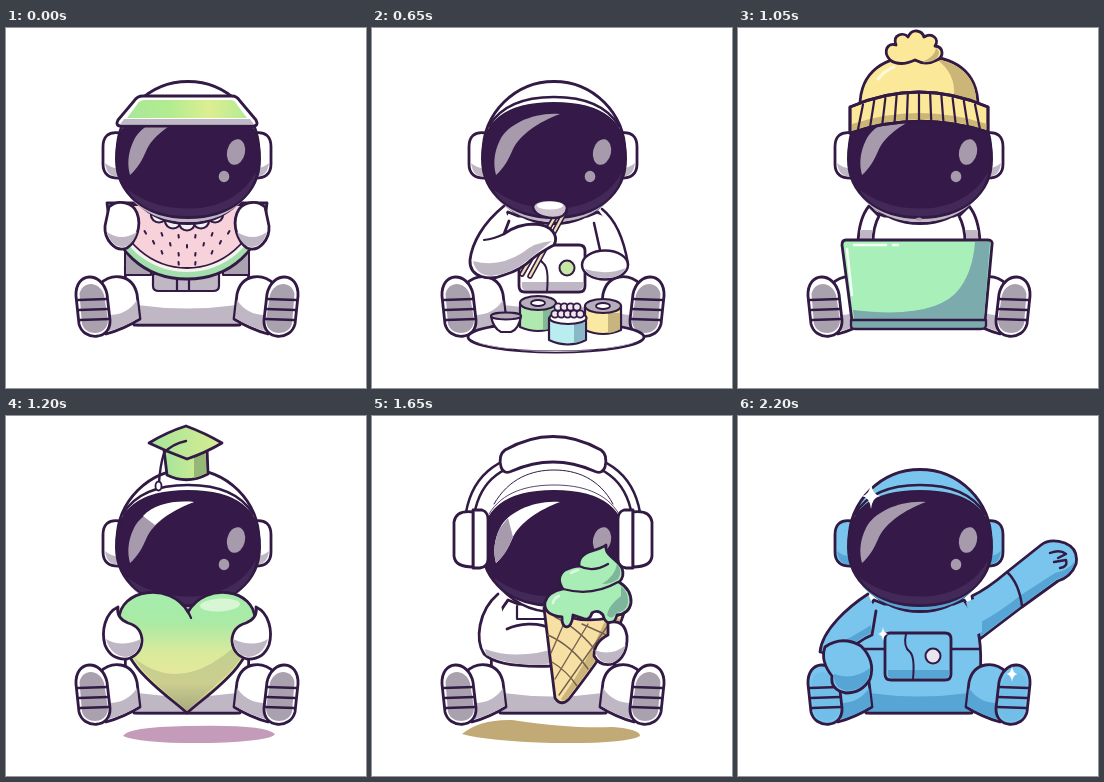
Write an HTML page that moves like this. It is 360 px wide and 360 px high and loops after 2250 ms.

```html
<!DOCTYPE html>
<html lang="en">
<head>
<meta charset="utf-8">
<title>Astronaut moods</title>
<style>
html, body { margin: 0; width: 100%; height: 100%; overflow: hidden; background: #fff; }
svg { display: block; width: 100vw; height: 100vh; }
.pose { display: none; }
</style>
</head>
<body>
<svg id="stage" viewBox="0 0 360 360" stroke-linecap="round" stroke-linejoin="round"></svg>
<script>
const INK = '#321a45', VISOR = '#351a49', GLARE = '#a69aac';
const WHITE = { suit: '#fff', shade: '#bfb7c4', sole: '#a9a1ae' };
const BLUE = { suit: '#79c5ed', shade: '#56a5d5', sole: '#71bfe9' };

// drawing helpers: outlined shape, flat shape, line, mirrored copy
const shape = (d, fill, w = 2.8) => `<path d="${d}" fill="${fill}" stroke="${INK}" stroke-width="${w}"/>`;
const flat = (d, fill) => `<path d="${d}" fill="${fill}"/>`;
const line = (d, w = 2.5, color = INK) => `<path d="${d}" fill="none" stroke="${color}" stroke-width="${w}"/>`;
const oval = (x, y, rx, ry, fill, w = 2.5, turn = 0) =>
  `<ellipse cx="${x}" cy="${y}" rx="${rx}" ry="${ry}" fill="${fill}" transform="rotate(${turn} ${x} ${y})"` +
  (w ? ` stroke="${INK}" stroke-width="${w}"/>` : '/>');
const flip = s => `<g transform="translate(362) scale(-1 1)">${s}</g>`;
const both = s => s + flip(s);

const grad = (id, stops, dir) => `<linearGradient id="${id}" ${dir}>` +
  stops.map((c, i) => `<stop offset="${i / (stops.length - 1)}" stop-color="${c}"/>`).join('') + '</linearGradient>';
const DOWN = 'x1="0" y1="0" x2="0" y2="1"';
const defs = '<defs>' +
  grad('band', ['#a9e89a', '#b2eb90', '#dcee92', '#b0ea95'], 'gradientUnits="userSpaceOnUse" x1="120" y1="0" x2="245" y2="0"') +
  grad('heart', ['#a6edae', '#a9eaa5', '#d9ea9c', '#e9e79b', '#a9a880'], DOWN) +
  grad('cap', ['#a5e59b', '#d8ec91'], 'x1="0" y1="0" x2="1" y2="0"') + '</defs>';

function ears(c) {
  return both(shape('M114 105 C102 103 97 109 97 119 V136 C97 146 103 151 115 150Z', c.suit) +
    flat('M99 135 Q106 141 113 140 V148 Q101 150 99 135Z', c.shade));
}

function body(c) {
  const torso = shape('M146 188 L136 184 C119 205 118 235 120 262 L128 297 H234 L242 262 C244 235 243 205 226 184 L216 188Z', c.suit) +
    flat('M131 277 Q181 284 231 277 V296 H131Z', c.shade) + line('M131 297 H231');
  const leg = shape('M94 256 C105 245 126 245 131 266 L134 291 Q118 301 100 306Z', c.suit) +
    flat('M103 287 Q121 287 131 272 L133 290 Q118 299 103 303Z', c.shade);
  const sole = shape('M70 268 C69 243 96 243 101 266 L104 292 C105 313 77 313 73 296Z', c.suit) +
    flat('M73.5 266 C76 253 93 252 98 267 L102 292 C102 308 80 309 76 296Z', c.sole) +
    line('M72 272 L101 271 M73 282 L102 281 M74 292 L103 291', 2.4);
  return torso + both(leg + sole);
}

function pack(c, knob) {
  return shape('M152 217 H207 Q213 217 213 223 V258 Q213 264 207 264 H153 Q147 264 147 258 V223 Q147 217 152 217Z', c.suit) +
    flat('M150 254 H211 Q212 262 207 262 H153 Q149 262 150 254Z', c.shade) +
    line('M168 218 Q165 231 172 236 Q177 241 175 263', 2) + oval(195, 240, 7.5, 7.5, knob, 2);
}

const RIDGE = 'M117 98 C130 76 155 69 182 69 C209 69 234 76 247 98';
const RIM = 'M124 170 Q181 204 239 170 Q218 194 182 194 Q146 194 124 170Z';
const shell = c => oval(182, 124.5, 71, 71, c.suit, 2.8) + flat(RIM, c.shade) + line(RIDGE);

// "lit" tints the upper part of the long reflection
function visor(lit = GLARE, low = GLARE) {
  return shape('M110 131 C110 95 132 75 182 75 C232 75 254 95 254 131 C254 165 226 190 182 190 C138 190 110 165 110 131Z', VISOR, 2) +
    flat('M122 162 Q152 184 195 180 Q234 174 250 144 C246 170 222 188 182 188 C151 188 130 177 122 162Z', '#422957') +
    flat('M188 86 C162 84 136 96 128 112 C122 124 121 136 124 147 C131 141 136 133 141 121 C148 107 166 94 188 86Z', low) +
    (lit === low ? '' : flat('M137 100 C148 88 168 84 188 86 C172 92 158 100 149 109Z', lit)) +
    oval(230, 124, 9, 13, GLARE, 0, 12) + oval(218, 148.5, 5.3, 5.8, GLARE, 0);
}

const head = (c, lit, low) => shell(c) + visor(lit, low);

function melon() {
  const c = WHITE;
  let seeds = '';
  [[208, 6], [217, 5], [226, 4], [235, 2]].forEach(([y, n]) => {
    for (let i = 0; i < n; i++) {
      const k = i - (n - 1) / 2;
      seeds += line(`M${181 + k * 17} ${y - Math.abs(k) * 2} l${-k * .6} 2.6`, 2);
    }
  });
  let bites = '';
  for (let i = -2; i <= 2; i++) bites += oval(181 + i * 14, 195 - i * i * 2, 8, 7.5, '#f3f0f4', 2.2);
  const slice = shape('M101 175 H261 C257 222 224 251 181 251 C138 251 105 222 101 175Z', '#a3dfac') +
    flat('M106 177 H256 C252 216 220 244 181 244 C142 244 110 216 106 177Z', '#f5f4ec') +
    shape('M109 177 H253 C248 214 216 240 181 240 C146 240 114 214 109 177Z', '#f8d2da', 1.8);
  const hand = shape('M103 179 C112 171 127 174 131 185 C136 198 130 214 121 220 C109 225 98 211 99 198Z', c.suit) +
    flat('M101 204 Q115 214 131 204 Q126 219 116 219 Q105 218 101 204Z', c.shade);
  const hat = shape('M137 68 H226 Q231 68 234 73 L250 92 Q253 98 247 98 H115 Q109 98 112 92 L128 73 Q131 68 137 68Z', '#fff') +
    flat('M138 72 H225 Q229 72 232 78 L241 90 H121 L130 78 Q133 72 138 72Z', 'url(#band)') +
    flat('M118 91 H244 L248 96.5 H114Z', '#bfb9c5');
  return ears(c) + body(c) + shape('M119 222 H145 V247 H119Z M217 222 H243 V247 H217Z', '#aaa3af', 2) +
    shape('M147 246 V258 Q147 263 153 263 H207 Q213 263 213 258 V246Z', c.shade, 2.2) + line('M171 250 V263 M183 250 V263', 2.2) +
    slice + seeds + bites + head(c) + hat + both(hand);
}

function roll(x, y, tint, shade) {
  return shape(`M${x - 18} ${y - 11} V${y + 13} Q${x} ${y + 21} ${x + 18} ${y + 13} V${y - 11}Z`, tint, 2.2) +
    flat(`M${x + 5} ${y - 4} H${x + 17} V${y + 12} Q${x + 11} ${y + 16} ${x + 5} ${y + 16}Z`, shade) +
    oval(x, y - 11, 18, 7, '#b5afb9', 2.2) + oval(x, y - 11, 7, 3, '#fff', 1.8);
}

function sushi() {
  const c = WHITE;
  let roe = '';
  for (let i = 0; i < 9; i++) roe += oval(183 + (i % 5) * 6.3 + (i > 4 ? 3 : 0), i > 4 ? 279 : 286, 3.7, 3.7, '#f2e6f0', 1.8);
  const rightArm = flat('M226 186 C243 192 252 212 256 238 L230 226Z', c.suit) +
    line('M230 181 C244 192 252 212 256 236 M222 195 L228 222') +
    oval(233, 237, 23, 14.5, c.suit) +
    flat('M213 241 Q234 248 254 240 Q250 250 233 250 Q217 250 213 241Z', c.shade);
  const leftArm = shape('M132 178 C111 195 100 215 98 232 C97 250 118 253 132 247 Q149 242 160 231 Q169 224 182 217 C187 208 180 197 163 196 Q145 196 132 206 L137 193', c.suit) +
    flat('M101 233 Q126 240 150 225 Q163 214 180 213 Q166 224 156 232 Q140 246 119 248 Q104 247 101 233Z', c.shade) +
    line('M132 206 Q122 211 112 212', 2.2);
  const sticks = line('M150 246 L187 182 M158 248 L193 184', 5.5) + line('M150 246 L187 182 M158 248 L193 184', 2.4, '#f0dfae');
  const bite = shape('M161 179 Q162 172 178 172 Q194 172 195 180 Q194 190 181 190 Q163 189 161 179Z', '#cfc3d2', 2.4) +
    oval(178, 177.5, 13, 4, '#fff', 0);
  return ears(c) + body(c) + pack(c, '#c5e9a5') + head(c) + rightArm + sticks + leftArm + bite +
    oval(184, 309, 88, 15, '#fff', 2.8) + flat('M103 314 Q184 334 265 314 Q240 323 184 323 Q128 323 103 314Z', '#cbc6d0') +
    roll(166, 286, '#afe9af', '#83b996') + roll(231, 289, '#fae9a2', '#c6b57d') +
    shape('M177 290 V312 Q196 321 214 312 V290Z', '#b9edf0', 2.2) + flat('M202 295 H213 V311 Q208 314 202 315Z', '#87b9c7') +
    oval(196, 290, 18.5, 6, '#fff', 2.2) + roe +
    shape('M119 288 H149 Q147 301 139 304 H129 Q121 300 119 288Z', '#fff', 2.2) + oval(134, 288, 15, 3.4, '#b5afb9', 2);
}

function laptop() {
  const c = WHITE;
  let ribs = '';
  for (let i = -5; i <= 5; i++) ribs += line(`M${181 + i * 11.2} ${66 + i * i * .42} L${181 + i * 12.2} ${92 + i * i * .38}`, 2.2);
  const hat = shape('M122 78 C122 43 147 28 181 28 C216 28 240 43 240 78Z', '#fbe898') +
    flat('M198 31 C225 36 238 52 238 72 L216 68 Q218 45 198 31Z', '#cbb577') +
    shape('M152 32 C144 23 150 14 158 17 C154 6 166 4 170 9 C174 0 184 2 186 9 C194 4 202 11 197 18 C206 19 206 29 199 32 Q188 38 177 32 Q162 39 152 32Z', '#fbe898') +
    flat('M184 34 Q197 29 198 20 Q204 24 198 31 Q192 35 184 34Z', '#cbb577') +
    shape('M112 79 Q181 49 250 79 V104 Q181 82 112 105Z', '#fbe898') +
    flat('M114 96 Q181 74 249 96 V102 Q181 80 114 103Z', '#cbb577') + ribs +
    line('M112 79 Q181 49 250 79 V104 Q181 82 112 105Z', 2.8) + line('M140 51 Q146 43 156 39', 3, '#fff8d8');
  const arm = shape('M131 178 Q121 190 120 215 H135 Q135 199 141 188Z', c.suit) + flat('M122 202 H134 V213 H122Z', c.shade);
  return ears(c) + body(c) + both(arm) + head(c) + oval(181, 191, 3, 1.5, GLARE, 0) + hat +
    shape('M108 212 H250 Q255 212 254 217 L247 293 H114 L104 217 Q104 212 108 212Z', '#a9efba') +
    flat('M237 214 H252 L246 291 H116 L115 282 Q199 292 222 260 Q235 242 237 214Z', '#7cabad') +
    line('M116 217 H148 M155 217 H160 M109 221 L114 267', 2.5, '#f2fff4') +
    shape('M113 292 H248 V298 Q247 301 243 301 H118 Q113 301 113 298Z', '#7cabad', 2.3);
}

function heart() {
  const c = WHITE;
  const hand = shape('M112 191 C99 197 95 215 99 229 Q105 244 121 243 Q135 239 136 225 Q136 211 122 207 Q110 202 112 191Z', c.suit) +
    flat('M100 223 Q115 232 135 223 Q133 239 120 241 Q105 240 100 223Z', c.shade);
  const cap = shape('M158 34 L161 59 Q181 69 202 58 L201 32Z', 'url(#cap)') +
    flat('M188 39 L200 34 V57 Q194 61 188 62Z', '#95b777') +
    shape('M143 27 Q161 16 180 10 Q199 17 216 27 Q199 37 181 43 Q162 36 143 27Z', 'url(#cap)') +
    line('M180 25 Q166 28 158 37 Q154 50 153 67', 2.4) + oval(152.5, 70, 3, 4.5, '#fff', 1.8);
  return flat('M117 320 Q121 311 180 310 Q260 308 269 318 Q266 325 205 327 Q135 328 117 320Z', '#c49cb9') +
    ears(c) + body(c) + head(c, '#fff') + cap +
    shape('M181 297 C158 276 113 250 113 204 C113 173 164 165 182 196 C200 165 249 173 249 204 C249 250 204 276 181 297Z', 'url(#heart)') +
    flat('M247 212 C243 250 201 274 181 294 C166 280 141 264 127 241 Q181 286 247 212Z', '#9da87b66') +
    oval(214, 189, 20, 6.5, '#d8f6d4', 0, -3) + line('M182 196 Q184 199 185 202', 2.3) + both(hand);
}

function iceCream() {
  const c = WHITE;
  const arm = shape('M126 178 C106 195 103 224 112 238 Q126 252 180 250 C194 242 193 221 180 213 C165 205 146 208 135 213', c.suit) +
    flat('M113 233 Q145 245 189 231 Q187 247 174 248 Q139 251 114 239Z', c.shade) + line('M145 190 V203 H172', 2.2);
  const hand = shape('M236 207 Q252 202 255 220 Q256 241 241 248 Q228 251 222 240 Q222 226 236 219Z', c.suit) +
    flat('M223 234 Q239 241 254 229 Q250 244 239 247 Q226 248 223 234Z', c.shade);
  const cone = shape('M172 192 Q213 213 252 197 L248 208 Q236 233 197 283 Q189 291 183 282Z', '#f6e0a3') +
    flat('M232 207 L249 202 Q239 226 195 283 Q191 286 189 283 Q216 245 232 207Z', '#cdb47a') +
    line('M176 219 Q200 230 216 253 M180 246 Q195 255 205 270 M183 201 Q208 213 227 239 M210 208 L239 221 M193 205 L179 237 M216 208 L183 263 M239 205 L187 279', 1.4, '#74604f');
  const swirl = shape('M234 129 C232 139 245 143 250 152 Q253 161 247 166 Q260 174 259 187 Q257 198 245 199 C242 211 233 208 231 199 Q226 193 220 197 Q217 206 210 202 L201 199 C200 215 189 214 190 201 Q171 199 173 186 Q176 176 191 173 Q183 162 193 154 Q201 150 207 150 Q206 139 220 135 Q230 132 234 129Z', '#a8edb6') +
    flat('M249 170 Q257 177 256 187 Q254 196 244 197 Q240 205 235 199 Q236 190 249 180Z M245 148 Q251 155 246 163 Q240 168 230 168 Q243 160 245 148Z', '#7eb59c') +
    line('M191 173 Q220 181 246 166 M207 150 Q221 157 236 148', 2.3) +
    line('M199 157 Q202 155 206 154 M181 187 Q182 182 187 180', 2.5, '#e1f9e5');
  const cup = shape('M101 94 H110 Q116 96 116 103 V143 Q116 151 108 152 H101Z', c.suit) +
    shape('M101 96 Q84 94 82 106 V140 Q83 151 101 151Z', c.suit);
  const arc = 'M98 98 C104 63 127 40 181 40 C235 40 258 63 264 98';
  const band = line(arc, 11) + line(arc, 6, '#fff') +
    shape('M133 34 Q181 7 229 34 Q236 39 233 51 Q230 59 222 55 Q181 37 140 55 Q132 59 129 51 Q126 39 133 34Z', c.suit);
  const helmet = flat(RIM, c.shade) + oval(182, 124.5, 71, 71, c.suit, 0) + line('M122 88 C137 62 160 54 182 54 C204 54 227 62 241 88', 1) +
    line(RIDGE, .8) + line('M122 164 Q146 196 182 196 Q222 196 244 160');
  return flat('M90 318 Q108 303 140 304 Q200 313 240 311 Q268 313 268 320 Q255 328 180 327 Q115 325 90 318Z', '#c2aa76') +
    body(c) + helmet + visor('#fff', '#fff') + flat('M124 147 C121 136 122 124 128 112 L136 102 L141 121 Q134 139 124 147Z', GLARE) +
    band + both(cup) + arm + cone + swirl + hand;
}

const SPARKS = [[133, 80, 13], [145, 218, 7], [274, 258, 8]];
function wave() {
  const c = BLUE;
  const raised = shape('M234 180 Q249 173 269 156 L303 129 Q312 122 327 127 Q341 133 338 148 Q333 161 320 165 L284 191 Q263 207 242 223Z', c.suit) +
    flat('M241 207 Q262 196 283 179 L317 157 Q331 154 337 145 Q334 159 319 163 L284 189 Q262 205 242 221Z', c.shade) +
    line('M269 156 Q281 167 284 190 M312 137 Q322 133 328 138 L320 142 M316 146 L328 144 Q330 151 322 152', 2.4);
  const bent = shape('M130 178 C110 191 84 214 82 236 L104 241 Q119 225 134 219 L138 195', c.suit) +
    flat('M91 232 Q108 225 133 209 V217 Q119 223 105 238Z', c.shade) +
    shape('M87 231 Q104 219 123 230 Q138 245 132 263 Q124 277 108 277 Q92 274 94 260 Q82 245 87 231Z', c.suit) +
    flat('M96 258 Q115 265 132 252 Q132 273 109 275 Q95 272 96 258Z', c.shade);
  const sparks = SPARKS.map(([x, y]) =>
    `<g transform="translate(${x} ${y})"><path class="spark" fill="#fff" d="M0 -1 Q.1 -.1 .7 0 Q.1 .1 0 1 Q-.1 .1 -.7 0 Q-.1 -.1 0 -1Z"/></g>`).join('');
  return ears(c) + raised + body(c) + flat('M228 186 L244 180 V216 L236 220Z', c.suit) +
    line('M121 233 H147 M213 233 H242', 2.3) + pack(c, '#e8e5ef') + bent + head(c) + sparks;
}

const LOOP = 2250, STEP = 50;
const starts = [0, 400, 750, 1150, 1500, 1900];
const stage = document.getElementById('stage');
stage.innerHTML = defs + [melon, sushi, laptop, heart, iceCream, wave]
  .map(draw => `<g class="pose">${draw()}</g>`).join('');
const poses = stage.querySelectorAll('.pose');
const sparks = stage.querySelectorAll('.spark');
const band = document.getElementById('band');

function render(now) {
  const t = Math.floor((now % LOOP) / STEP) * STEP;
  const current = starts.filter(s => s <= t).length - 1;
  poses.forEach((p, i) => { p.style.display = i === current ? 'inline' : 'none'; });
  // sheen slides along the hat band
  band.setAttribute('gradientTransform', `translate(${-Math.max(0, t - 100) * .12})`);
  const glow = Math.min(1, Math.max(0, (t - 1900) / 250));
  sparks.forEach((s, i) => s.setAttribute('transform', `scale(${SPARKS[i][2] * glow})`));
}

const begin = performance.now();
function tick() {
  render(performance.now() - begin);
  requestAnimationFrame(tick);
}
tick();
</script>
</body>
</html>
```
